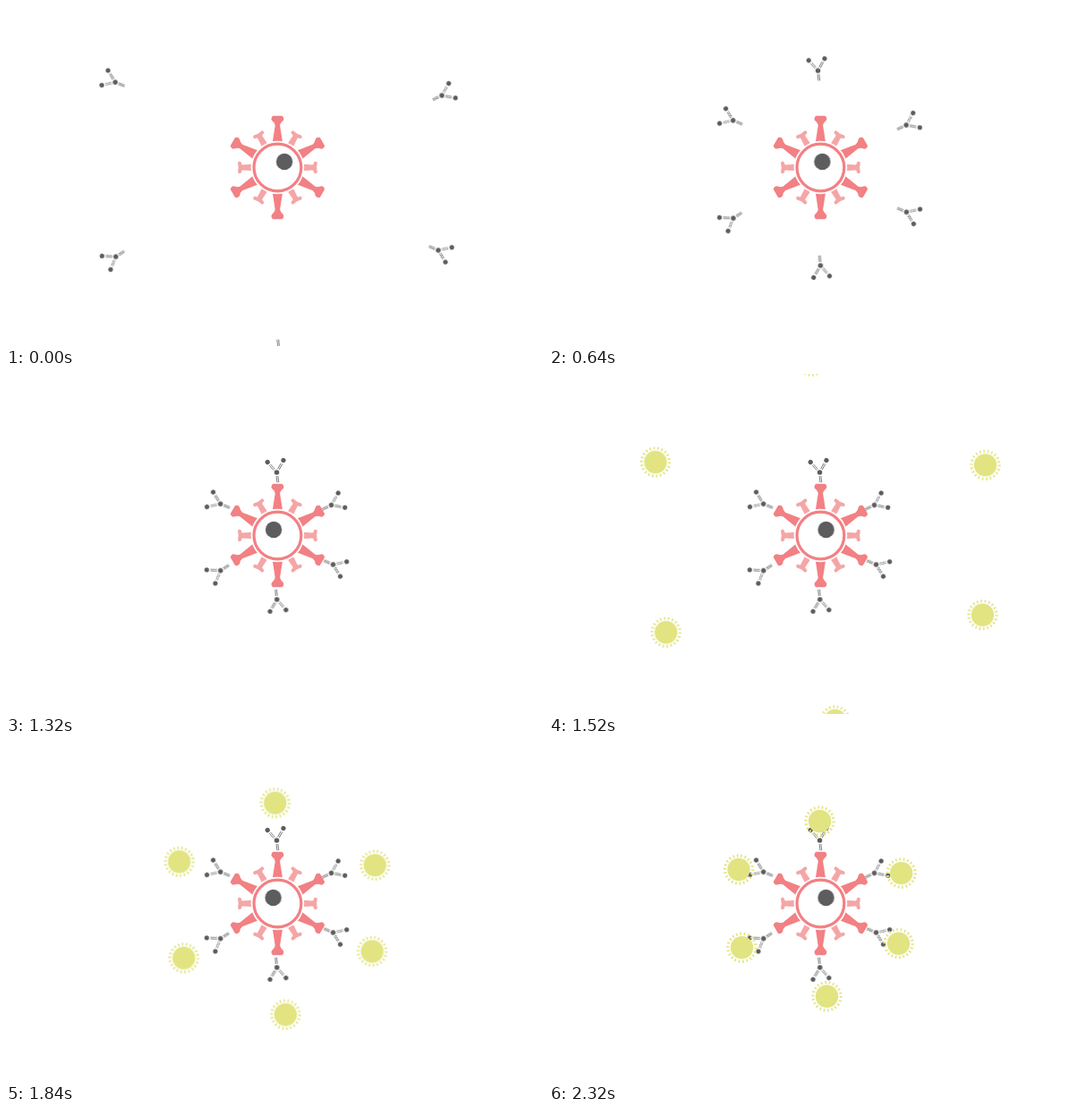
An HTML page without scripts for the animation above (2.36 s loop, 600x380 px).

```html
<!DOCTYPE html>
<html lang="en">
<head>
<meta charset="utf-8">
<title>Antibodies meet a virus</title>
<style>
  html, body { margin: 0; width: 100%; height: 100%; overflow: hidden; background: #fff; }
  svg { display: block; width: 100vw; height: 100vh; }

  .antibody, .cell, .pupil { animation: 2360ms linear infinite; }
  .antibody { animation-name: approach; }
  .cell { animation-name: arrive; }
  .pupil { animation-name: look; }

  /* quadratic acceleration, docked at 760 ms */
  @keyframes approach {
    0% { transform: translate(var(--x), var(--y)); animation-timing-function: cubic-bezier(.3333, 0, .6667, .3333); }
    32.203%, 100% { transform: translate(0, 0); }
  }
  /* hidden until 1360 ms, docked at 1920 ms */
  @keyframes arrive {
    0% { opacity: 0; transform: translate(var(--x), var(--y)); animation-timing-function: step-end; }
    57.62% { opacity: 1; transform: translate(var(--x), var(--y)); }
    81.356%, 100% { opacity: 1; transform: translate(0, 0); }
  }
  /* 800 ms sweep from side to side */
  @keyframes look {
    0% { transform: translateX(9.2px); }
    15.932%, 49.831%, 83.729% { transform: translateX(-10.4px); }
    32.881%, 66.78% { transform: translateX(10.5px); }
    100% { transform: translateX(9.6px); }
  }
</style>
</head>
<body>
<svg viewBox="0 0 600 380">
  <defs>
    <path id="rod" d="M-.9-4V-11.3M.9-4V-11.3" fill="none" stroke="#5c5c5c" stroke-width=".75"/>
    <g id="arm">
      <use href="#rod"/>
      <circle cy="-15.4" r="2.6"/>
    </g>
    <g id="antibody" fill="#5c5c5c">
      <circle r="2.75"/>
      <use href="#arm" transform="rotate(-42)"/>
      <use href="#arm" transform="rotate(29)"/>
      <use href="#rod" transform="rotate(173)"/>
    </g>
    <g id="cell">
      <circle r="12.7" fill="#e2e481"/>
      <circle r="15.6" fill="none" stroke="#e2e481" stroke-width="3.2" pathLength="66" stroke-dasharray="1.1 1.9"/>
    </g>
    <path id="spike" fill="#f28084" d="M-5.8-27-2.7-47Q-3.2-50-6-52.2-7.8-54-6.1-56.8-5.6-57.8-4.5-57.8H4.5Q5.6-57.8 6.1-56.8 7.8-54 6-52.2 3.2-50 2.7-47L5.8-27Z"/>
    <path id="stub" fill="#f4a6a7" d="M-3.7-27-2.9-39Q-3-40.4-5-40.4-6.7-40.6-6.7-42.4-6.6-44.5-4.8-44.4L0-43.6 4.8-44.4Q6.6-44.5 6.7-42.4 6.7-40.6 5-40.4 3-40.4 2.9-39L3.7-27Z"/>
    <g id="pair">
      <use href="#spike"/>
      <use href="#stub" transform="rotate(30)"/>
    </g>
    <g id="trio">
      <use href="#pair"/>
      <use href="#pair" transform="rotate(60)"/>
      <use href="#pair" transform="rotate(120)"/>
    </g>
  </defs>

  <rect width="600" height="380" fill="#fff"/>

  <g transform="translate(303.4 180.5)">
    <use href="#trio"/>
    <use href="#trio" transform="rotate(180)"/>
    <circle r="29.8" fill="#fff"/>
    <circle r="26.4" fill="#fff" stroke="#f28084" stroke-width="3.2"/>
  </g>
  <circle class="pupil" cx="301.9" cy="174" r="9.2" fill="#5d5d5d"/>

  <g class="antibody" style="--x:-7px;--y:-130.6px"><use href="#antibody" transform="translate(302.5 110)"/></g>
  <g class="antibody" style="--x:123.5px;--y:-46.5px"><use href="#antibody" transform="translate(363.5 146.5) rotate(71.5)"/></g>
  <g class="antibody" style="--x:117.5px;--y:60px"><use href="#antibody" transform="translate(365.5 213) rotate(120)"/></g>
  <g class="antibody" style="--x:2.3px;--y:132px"><use href="#antibody" transform="translate(302.7 252) rotate(181)"/></g>
  <g class="antibody" style="--x:-117px;--y:60.5px"><use href="#antibody" transform="translate(239.7 219.7) rotate(-116)"/></g>
  <g class="antibody" style="--x:-117.5px;--y:-60px"><use href="#antibody" transform="translate(239.6 145.2) rotate(-60.5)"/></g>

  <g class="cell" style="--x:-12.8px;--y:-144.7px"><use href="#cell" transform="translate(302.5 88.5)"/></g>
  <g class="cell" style="--x:131.8px;--y:-63px"><use href="#cell" transform="translate(393.6 146.6)"/></g>
  <g class="cell" style="--x:131.8px;--y:61.8px"><use href="#cell" transform="translate(390.5 225.2)"/></g>
  <g class="cell" style="--x:12.8px;--y:144.7px"><use href="#cell" transform="translate(310.5 284.3)"/></g>
  <g class="cell" style="--x:-119px;--y:82.8px"><use href="#cell" transform="translate(215.5 229.7)"/></g>
  <g class="cell" style="--x:-130.7px;--y:-61.8px"><use href="#cell" transform="translate(212 142.5)"/></g>
</svg>
</body>
</html>
```
